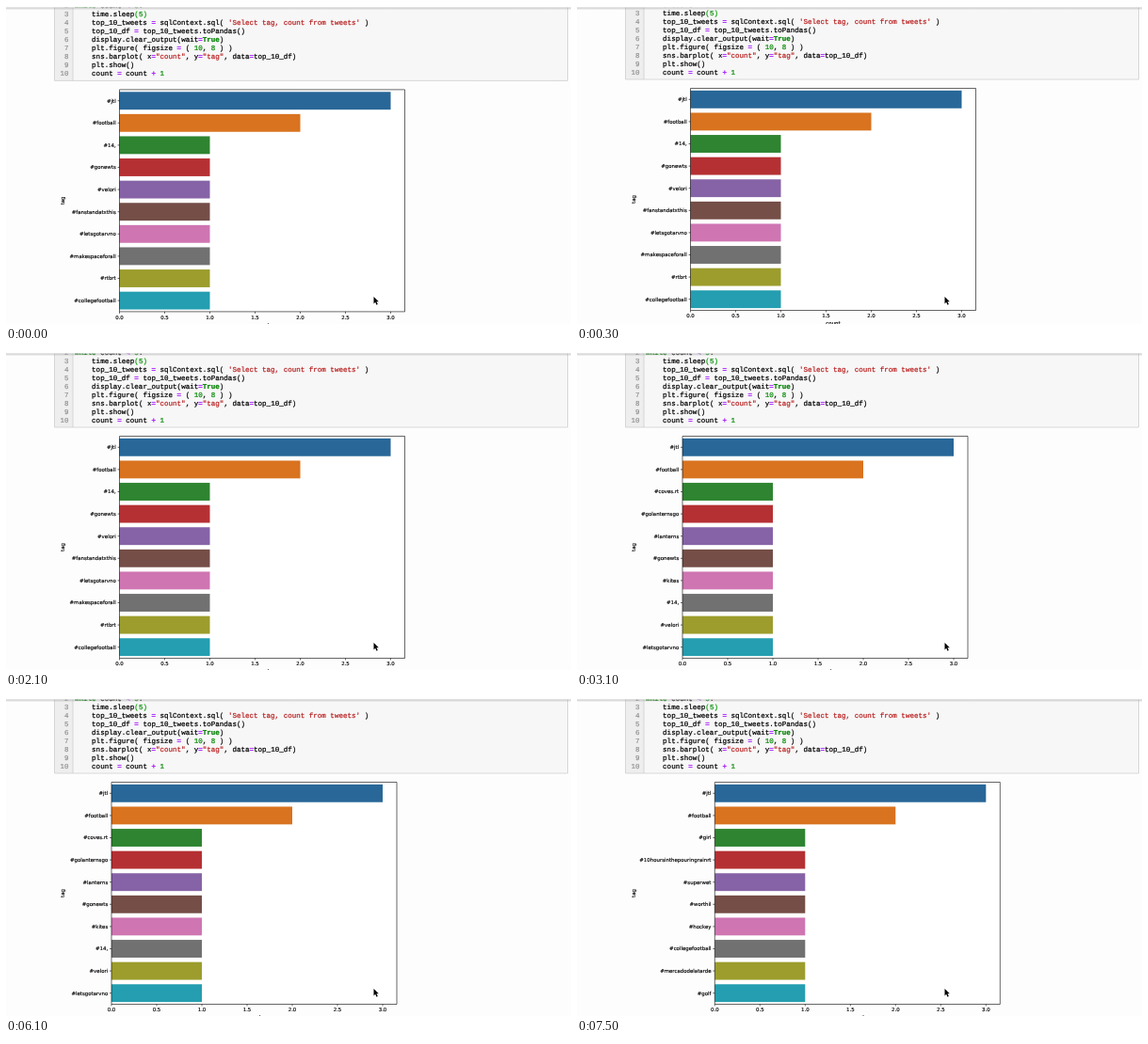
Recreate the animation shown at these times as an HTML page with a canvas. Size 600x338 px, loop 8000 ms.

```html
<!DOCTYPE html>
<html lang="en">
<head>
<meta charset="utf-8">
<style>
html, body { margin: 0; width: 100%; height: 100%; overflow: hidden; background: #fdfdfd; }
canvas { display: block; width: 600px; height: 338px; }
</style>
</head>
<body>
<canvas id="stage" width="600" height="338"></canvas>
<script>
const ctx = document.getElementById('stage').getContext('2d');
const LOOP = 8000, STEP = 100;
const MONO = '"Liberation Mono", "Courier New", monospace';
const SANS = '"DejaVu Sans", sans-serif';
const CHAR = 4.525;

const code = [
  'while count < 5:',
  '    time.sleep(5)',
  "    top_10_tweets = sqlContext.sql( 'Select tag, count from tweets' )",
  '    top_10_df = top_10_tweets.toPandas()',
  '    display.clear_output(wait=True)',
  '    plt.figure( figsize = ( 10, 8 ) )',
  '    sns.barplot( x="count", y="tag", data=top_10_df)',
  '    plt.show()',
  '    count = count + 1'
];

// Syntax rules: pattern, colour, bold
const rules = [
  [/^('[^']*'|"[^"]*")/, '#ba2121'],
  [/^(while|True)\b/, '#008000', true],
  [/^\d+\b/, '#008800'],
  [/^[=+<]/, '#aa22ff', true],
  [/^(\((?=5)|\)(?=$))/, '#00a000'],
  [/^(\w+|\s+|.)/, '#000']
];

const colours = ['#286798', '#d9731f', '#2e8430', '#b53033', '#8663a6',
  '#744e47', '#cf75b2', '#717171', '#9c9d2c', '#249eb0'];

const charts = [
  { from: 0, x: 120.5, tags: ['jtl', 'football', '14,', 'gonewts', 'velori', 'fanstandatxthis',
    'letsgotarvno', 'makespaceforall', 'rtbrt', 'collegefootball'] },
  { from: 2200, x: 112, tags: ['jtl', 'football', 'coves.rt', 'golanternsgo', 'lanterns', 'gonewts',
    'kites', '14,', 'velori', 'letsgotarvno'] },
  { from: 7400, x: 146.3, tags: ['jtl', 'football', 'girl', '10hoursinthepouringrainrt', 'superwet',
    'worthil', 'hockey', 'collegefootball', 'mercadodelatarde', 'golf'] }
];

// Page scroll in pixels, one value per step until it settles
const scroll = [-0.6, -1, -1.6, -2, -2, -1.6, -1.1, -0.6, -0.2, 0];

function text(str, x, y, font, colour = '#000', align = 'left', weight = 0.15) {
  ctx.font = font;
  ctx.textAlign = align;
  ctx.fillStyle = ctx.strokeStyle = colour;
  ctx.lineWidth = weight;
  ctx.fillText(str, x, y);
  ctx.strokeText(str, x, y);
}

function rect(x, y, w, h, colour) {
  ctx.fillStyle = colour;
  ctx.fillRect(x, y, w, h);
}

function drawLine(line, y) {
  let col = 0;
  const matched = line.includes('sleep');
  while (col < line.length) {
    const rest = line.slice(col);
    const rule = rules.find((r, i) => r[0].test(rest) && (i !== 4 || matched));
    const token = rest.match(rule[0])[0];
    const font = (rule[2] ? 'bold ' : '') + '7.54px ' + MONO;
    if (token.trim()) text(token, 73 + col * CHAR, y, font, rule[1], 'left', 0.22);
    col += token.length;
  }
}

function drawCell() {
  rect(51.5, -10, 545, 90, '#f7f7f7');
  rect(51.5, -10, 19.5, 90, '#eeeeee');
  ctx.strokeStyle = '#cfcfcf';
  ctx.lineWidth = 0.8;
  ctx.strokeRect(51.5, -10, 545, 90);
  ctx.beginPath();
  ctx.moveTo(71, -10);
  ctx.lineTo(71, 80);
  ctx.stroke();
  code.forEach((line, i) => {
    const y = 2.9 + i * 9;
    text(i + 2, 66.5, y, '7.54px ' + MONO, '#8a8a8a', 'right');
    drawLine(line, y);
  });
}

function drawChart({ x, tags }) {
  const top = 89.5, width = 303, height = 236, unit = 96, pitch = height / 10;
  const bottom = top + height, font = '5.43px ' + SANS;
  rect(x, top, width, height, '#fff');
  ctx.beginPath();
  tags.forEach((tag, i) => {
    const mid = top + pitch * (i + 0.5);
    rect(x, mid - pitch * 0.4, unit * Math.max(1, 3 - i), pitch * 0.8, colours[i]);
    ctx.moveTo(x - 1.9, mid);
    ctx.lineTo(x, mid);
  });
  for (let i = 0; i <= 6; i++) {
    ctx.moveTo(x + i * unit / 2, bottom);
    ctx.lineTo(x + i * unit / 2, bottom + 1.9);
  }
  ctx.rect(x, top, width, height);
  ctx.strokeStyle = '#000';
  ctx.lineWidth = 0.6;
  ctx.stroke();

  tags.forEach((tag, i) => text('#' + tag, x - 3.8, top + pitch * (i + 0.5) + 1.9, font, '#000', 'right'));
  for (let i = 0; i <= 6; i++) {
    text((i / 2).toFixed(1), x + i * unit / 2, bottom + 7.9, font, '#000', 'center');
  }
  text('count', x + width / 2, bottom + 15.9, font, '#000', 'center');
  ctx.save();
  ctx.translate(62, top + height / 2);
  ctx.rotate(-Math.PI / 2);
  text('tag', 0, 0, font, '#000', 'center');
  ctx.restore();
}

function drawHeader() {
  rect(0, 0, 600, 1.6, '#fff');
  const shade = ctx.createLinearGradient(0, 1.5, 0, 4.5);
  shade.addColorStop(0, 'rgba(150,150,150,.5)');
  shade.addColorStop(1, 'rgba(150,150,150,0)');
  rect(0, 1.5, 600, 3, shade);
}

function drawPointer() {
  const arrow = new Path2D('M390.5 309v7.4l1.7-1.6 1.3 2.9 1.3-.6-1.3-2.8h2.3z');
  ctx.strokeStyle = '#fff';
  ctx.lineWidth = 1;
  ctx.stroke(arrow);
  ctx.fillStyle = '#000';
  ctx.fill(arrow);
}

function frame(now) {
  const t = now % LOOP;
  const step = Math.min(Math.floor(t / STEP), scroll.length - 1);
  ctx.textRendering = 'geometricPrecision';
  ctx.lineJoin = 'round';
  rect(0, 0, 600, 338, '#fdfdfd');
  ctx.save();
  ctx.translate(0, scroll[step]);
  drawCell();
  drawChart(charts.filter(c => c.from <= t).pop());
  ctx.restore();
  drawHeader();
  drawPointer();
  requestAnimationFrame(() => frame(performance.now()));
}
frame(0);
</script>
</body>
</html>
```
